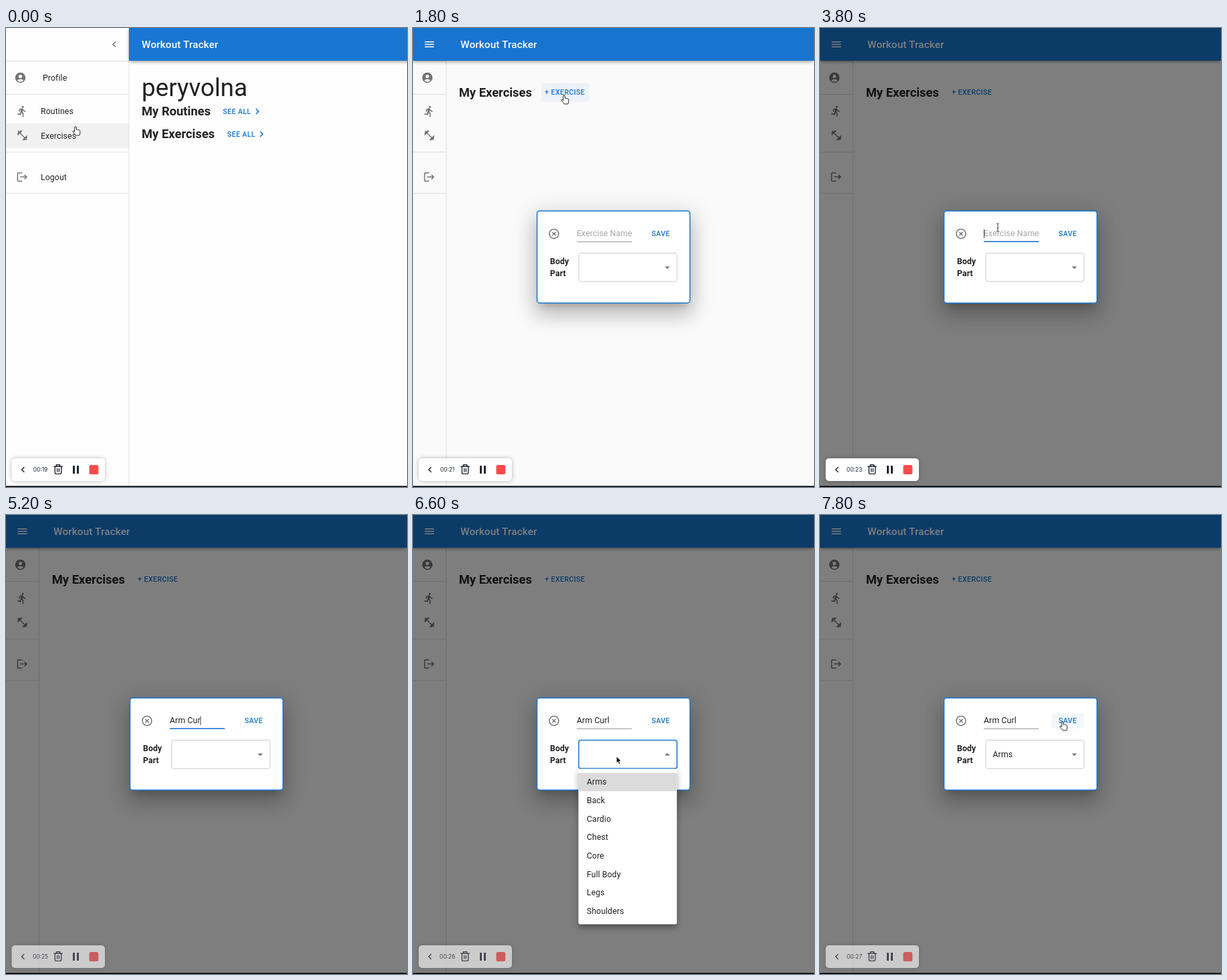
Animation of 600x688 px, one loop 8000 ms. Source, as an HTML page:

```html
<!DOCTYPE html>
<html lang="en">
<head>
<meta charset="utf-8">
<title>Workout Tracker</title>
<style>
html, body { margin: 0; width: 100%; height: 100%; overflow: hidden; background: #fff; }
svg { display: block; width: 600px; height: 688px; font-family: Roboto, Arial, sans-serif; }
text { fill: #212121; white-space: pre; }
.body { font-size: 12.27px; letter-spacing: .00938em; }
.bold { font-weight: 700; }
.h5 { font-size: 18.4px; font-weight: 700; }
.h3 { font-size: 36.8px; }
.title { font-size: 15.33px; font-weight: 500; letter-spacing: .0075em; fill: #fff; }
.button { font-size: 10.73px; font-weight: 500; letter-spacing: .02857em; fill: #1976d2; }
.time { font: 8.4px Inter, Arial, sans-serif; text-anchor: middle; fill: #1f2430; }
</style>
</head>
<body>
<svg id="stage" viewBox="0 0 600 688"></svg>
<script>
const LOOP = 8000;
const BLUE = '#1976d2', GREY = '#757575', INK = '#1f2430', LINE = '#e0e0e0';

const ICONS = {
  account: 'M12 2C6.48 2 2 6.48 2 12s4.48 10 10 10 10-4.48 10-10S17.52 2 12 2zm0 4c1.93 0 3.5 1.57 3.5 3.5S13.93 13 12 13s-3.5-1.57-3.5-3.5S10.07 6 12 6zm0 14c-2.03 0-4.43-.82-6.14-2.88C7.55 15.8 9.68 15 12 15s4.45.8 6.14 2.12C16.43 19.18 14.03 20 12 20z',
  run: 'M13.49 5.48c1.1 0 2-.9 2-2s-.9-2-2-2-2 .9-2 2 .9 2 2 2zm-3.6 13.9 1-4.4 2.1 2v6h2v-7.5l-2.1-2 .6-3c1.3 1.5 3.3 2.5 5.5 2.5v-2c-1.9 0-3.5-1-4.3-2.4l-1-1.6c-.4-.6-1-1-1.7-1-.3 0-.5.1-.8.1l-5.2 2.2v4.7h2v-3.4l1.8-.7-1.6 8.1-4.9-1-.4 2 7 1.4z',
  weights: 'M20.57 14.86 22 13.43 20.57 12 17 15.57 8.43 7 12 3.43 10.57 2 9.14 3.43 7.71 2 5.57 4.14 4.14 2.71 2.71 4.14l1.43 1.43L2 7.71l1.43 1.43L2 10.57 3.43 12 7 8.43 15.57 17 12 20.57 13.43 22l1.43-1.43L16.29 22l2.14-2.14 1.43 1.43 1.43-1.43-1.43-1.43L22 16.29z',
  logout: 'm17 7-1.41 1.41L18.17 11H8v2h10.17l-2.58 2.58L17 17l5-5zM4 5h8V3H4c-1.1 0-2 .9-2 2v14c0 1.1.9 2 2 2h8v-2H4V5z',
  left: 'M15.41 7.41 14 6l-6 6 6 6 1.41-1.41L10.83 12z',
  right: 'M10 6 8.59 7.41 13.17 12l-4.58 4.59L10 18l6-6z',
  menu: 'M3 18h18v-2H3zm0-5h18v-2H3zm0-7v2h18V6z',
  drop: 'm7 10 5 5 5-5z',
  close: 'M14.59 8 12 10.59 9.41 8 8 9.41 10.59 12 8 14.59 9.41 16 12 13.41 14.59 16 16 14.59 13.41 12 16 9.41zM12 2C6.47 2 2 6.47 2 12s4.47 10 10 10 10-4.47 10-10S17.53 2 12 2zm0 18c-4.41 0-8-3.59-8-8s3.59-8 8-8 8 3.59 8 8-3.59 8-8 8z'
};

// Markup helpers
const icon = (name, cx, cy, fill = GREY, scale = .767) =>
  `<path d="${ICONS[name]}" fill="${fill}" transform="translate(${cx} ${cy}) scale(${scale}) translate(-12 -12)"/>`;
const text = (str, x, y, cls = 'body', attrs = '') => `<text x="${x}" y="${y}" class="${cls}" ${attrs}>${str}</text>`;
const rect = (x, y, w, h, fill, attrs = '') => `<rect x="${x}" y="${y}" width="${w}" height="${h}" fill="${fill}" ${attrs}/>`;
const shadow = (x, y, w, h, layers) => layers.map(([dy, blur, spread, alpha]) =>
  rect(x - spread, y - spread + dy, w + 2 * spread, h + 2 * spread, '#000',
    `rx="3" opacity="${alpha}" style="filter:blur(${blur / 2}px)"`)).join('');
const group = (id, inner, attrs = '') => `<g id="${id}" ${attrs}>${inner}</g>`;

const parts = ['Arms', 'Back', 'Cardio', 'Chest', 'Core', 'Full Body', 'Legs', 'Shoulders'];

const profile = group('profile',
  text('peryvolna', 203, 102, 'h3') +
  text('My Routines', 203, 131, 'h5') + text('SEE ALL', 324.5, 128.8, 'button') + icon('right', 376, 125, BLUE) +
  text('My Exercises', 203, 165, 'h5') + text('SEE ALL', 331, 162.8, 'button') + icon('right', 382.3, 159, BLUE));

const exercises = group('exercises',
  text('My Exercises', 19, 103, 'h5') +
  rect(142, 82.7, 72, 28, BLUE, 'id="addHover" rx="3" opacity=".06"') +
  text('+ EXERCISE', 147.6, 100.4, 'button'));

const drawer = group('drawer',
  rect(0, 0, 184, 688, '#fefefe') +
  rect(0, 143, 184, 36.5, '#f2f1f2', 'id="rowHover"') +
  icon('left', 162, 24.5) +
  icon('account', 21.5, 74.5) + text('Profile', 55, 78.8) +
  icon('run', 24, 124.8) + text('Routines', 52, 129) +
  icon('weights', 24.5, 161) + text('Exercises', 52, 165.5) +
  icon('logout', 24.3, 223.3) + text('Logout', 52, 227.8) +
  [49, 99, 185.5, 247.5].map(y => rect(0, y, 184, 1, LINE)).join(''),
  'clip-path="url(#drawerClip)"') + rect(183.5, 0, 1, 688, LINE, 'id="drawerEdge"');

const header = group('header',
  shadow(0, 0, 600, 49, [[1.5, 3, -.8, .2], [3, 4, 0, .14], [.8, 7.6, 0, .12]]) +
  rect(0, 0, 600, 49, BLUE) +
  group('menuIcon', icon('menu', 24.5, 24.5, '#fff')) +
  text('Workout Tracker', 71, 29.5, 'title', 'id="title"'));

const dialog = group('dialog',
  shadow(185, 273.5, 230, 139, [[8.4, 11.5, -5.4, .2], [18.4, 29, 2.3, .14], [6.9, 35, 6, .12]]) +
  rect(185.6, 274.2, 228.8, 138, '#fff', `rx="4" stroke="${BLUE}" stroke-width="1.5"`) +
  icon('close', 211, 308.5) +
  text('', 245, 312.4, 'body', 'id="field"') +
  rect(245, 320, 82.5, .9, '#8f8f8f', 'id="underline"') +
  rect(245, 301.5, .9, 13.5, '#333', 'id="caret"') +
  rect(346, 297, 49, 23, BLUE, 'id="saveHover" rx="3" opacity=".05"') +
  text('SAVE', 357, 312.3, 'button') +
  text('Body', 205, 354, 'body bold') + text('Part', 205, 372.4, 'body bold') +
  rect(248, 337.5, 147, 42.6, 'none', 'id="select" rx="3"') +
  group('dropIcon', icon('drop', 0, 0)) +
  text('Arms', 258.5, 363, 'body', 'id="value"'));

const menu = group('menu',
  shadow(247.5, 380.5, 147.3, 233, [[3.8, 3.8, -2.3, .2], [6.1, 7.7, .8, .14], [2.3, 10.7, 1.5, .12]]) +
  rect(247.5, 380.5, 147.3, 233, '#fff', 'rx="3"') +
  rect(247.5, 386.5, 147.3, 27.6, '#dcdbdc') +
  parts.map((name, i) => text(name, 260, 404.4 + i * 27.64)).join(''));

const recorder = group('recorder',
  rect(8.5, 645, 139.5, 34, '#000', 'rx="5" opacity=".28" style="filter:blur(3px)"') +
  rect(8.5, 645, 139.5, 34, '#fff', 'rx="5"') +
  `<g fill="none" stroke="${INK}" stroke-width="1.4" stroke-linecap="round" stroke-linejoin="round">
    <path d="M27 658.5l-3.6 3.5 3.6 3.5M71.8 657.2h12.4M75.3 657v-2.2h5.4v2.2M73.3 657.4v9.2q0 1.8 1.8 1.8h5.8q1.8 0 1.8-1.8v-9.2M76.6 660.5v4.6M79.4 660.5v4.6"/></g>` +
  text('', 51.5, 665.2, 'time', 'id="clock"') +
  rect(100, 656, 3, 12, INK, 'rx=".6"') + rect(106, 656, 3, 12, INK, 'rx=".6"') +
  rect(124.5, 655, 13.8, 14, '#ff4b4b', 'rx="2.6"'));

const cursor = group('cursor', `
  <path id="hand" fill="#fff" stroke="#111" stroke-width=".9" stroke-linejoin="round"
    d="M-1.3 1.1a1.3 1.3 0 0 1 2.6 0v3.2q1.2-.7 2 .3q1.1-.6 1.8.4q1.6-.3 1.7 1.3v3q-.2 1.8-1 3.6h-5.6q-2-2.7-4-5q-.6-1.6 1-1.6l1.5 1.2z"/>
  <path id="arrow" stroke="#fff" stroke-width=".6" d="M0 0V9.5L2.2 7.6 3.8 11.2 5.4 10.5 3.9 7H6.8Z"/>
  <path id="beam" fill="none" stroke="#333" stroke-width=".9" d="M-2-6Q0-6 0-4.8Q0-6 2-6M0-5V5M-2 6Q0 6 0 4.8Q0 6 2 6M-1.2.8h2.4"/>`);

const stage = document.getElementById('stage');
stage.innerHTML =
  '<clipPath id="drawerClip"><rect id="drawerMask" width="184" height="688"/></clipPath>' +
  rect(0, 0, 600, 688, '#fefefe') + profile + exercises + drawer + header +
  rect(0, 0, 600, 688, '#000', 'id="backdrop"') + dialog + menu + recorder +
  rect(0, 686.4, 600, 1.6, '#000') + cursor;

const el = {};
stage.querySelectorAll('[id]').forEach(node => el[node.id] = node);

// Timing helpers
const progress = (t, from, to) => Math.min(1, Math.max(0, (t - from) / (to - from)));
const ease = p => p * p * (3 - 2 * p);
const mix = (a, b, p) => a + (b - a) * p;
const between = (t, from, to) => t >= from && t < to;
const show = (node, on) => node.setAttribute('visibility', on ? 'visible' : 'hidden');
const set = (node, attrs) => Object.entries(attrs).forEach(([key, val]) => node.setAttribute(key, val));
const latest = (steps, t) => steps.filter(step => step[0] <= t).pop()[1];

const PATH = [
  [0, 104, 148], [950, 104, 148], [1500, 226, 101], [3000, 226, 101], [3500, 266, 299], [5800, 266, 299],
  [6250, 304.5, 362], [6700, 304.5, 362], [6950, 300, 395], [7200, 300, 395], [7600, 363, 310], [LOOP, 363, 310]
];
const POINTERS = [
  [0, 'hand'], [1000, 'arrow'], [1400, 'hand'], [3050, 'arrow'], [3450, 'beam'], [4200, 'none'], [5800, 'beam'],
  [5950, 'arrow'], [6150, 'hand'], [6400, 'arrow'], [6850, 'hand'], [7100, 'arrow'], [7550, 'hand']
];
const TICKS = [0, 600, 1200, 2200, 3200, 4200, 5200, 6200, 7200].map((at, i) => [at, 19 + i]);
const TYPED = [
  [0, ''], [4200, 'A'], [4400, 'Ar'], [4600, 'Arm'], [4800, 'Arm C'], [5000, 'Arm Cu'], [5200, 'Arm Cur'], [5400, 'Arm Curl']
];

function drawPointer(t) {
  const i = PATH.findIndex(key => key[0] > t) - 1;
  const [t0, x0, y0] = PATH[i], [t1, x1, y1] = PATH[i + 1];
  const p = ease(progress(t, t0, t1));
  set(el.cursor, { transform: `translate(${mix(x0, x1, p)} ${mix(y0, y1, p)})` });
  const kind = latest(POINTERS, t);
  ['hand', 'arrow', 'beam'].forEach(name => show(el[name], name === kind));
}

function drawPage(t) {
  const closing = t >= 700;
  const p = ease(progress(t, 700, 920));
  const width = mix(184, 49.7, p);
  show(el.profile, t < 600);
  show(el.exercises, t >= 600);
  set(el.exercises, { transform: `translate(${width} 0)` });
  set(el.drawerMask, { width });
  set(el.drawerEdge, { x: width - .5 });
  set(el.header, { transform: `translate(${mix(184, 0, p)} 0)` });
  set(el.title, { x: closing ? 71 : 19 });
  show(el.menuIcon, closing);
  show(el.rowHover, t < 1100);
  show(el.addHover, between(t, 1400, 3050));
  set(el.backdrop, { opacity: t < 1800 ? 0 : mix(.015, .5, ease(progress(t, 1800, 2000))) });
}

function drawDialog(t) {
  show(el.dialog, t >= 1800);
  const typed = latest(TYPED, t);
  el.field.textContent = typed || 'Exercise Name';
  el.field.style.fill = typed ? '#212121' : '#a6a6a6';
  const editing = between(t, 3600, 6350);
  set(el.underline, editing ? { y: 319.4, height: 1.6, fill: BLUE } : { y: 320, height: .9, fill: '#8f8f8f' });
  const blinkOn = between(t, 4200, 5600) || Math.floor((t - 3600) / 500) % 2 === 0;
  show(el.caret, editing && blinkOn);
  set(el.caret, { x: 245 + (typed ? el.field.getComputedTextLength() : 0) });

  const focused = between(t, 6350, 7650);
  set(el.select, { stroke: focused ? BLUE : '#c6c6c6', 'stroke-width': focused ? 1.5 : .9 });
  const open = between(t, 6350, 7050);
  set(el.dropIcon, { transform: `translate(380.5 359) scale(1 ${open ? -1 : 1})` });
  set(el.menu, { opacity: ease(progress(t, 6350, 6550)) * (1 - ease(progress(t, 7050, 7250))) });
  show(el.value, t >= 7050);
  show(el.saveHover, t >= 7550);
}

function render(t) {
  drawPage(t);
  drawDialog(t);
  drawPointer(t);
  el.clock.textContent = '00:' + latest(TICKS, t);
  set(el.recorder, { opacity: mix(1, .6, ease(progress(t, 4200, 4600))) });
}

const start = performance.now();
function loop(now) {
  render(Math.max(0, now - start) % LOOP);
  requestAnimationFrame(loop);
}
render(0);
requestAnimationFrame(loop);
</script>
</body>
</html>
```
